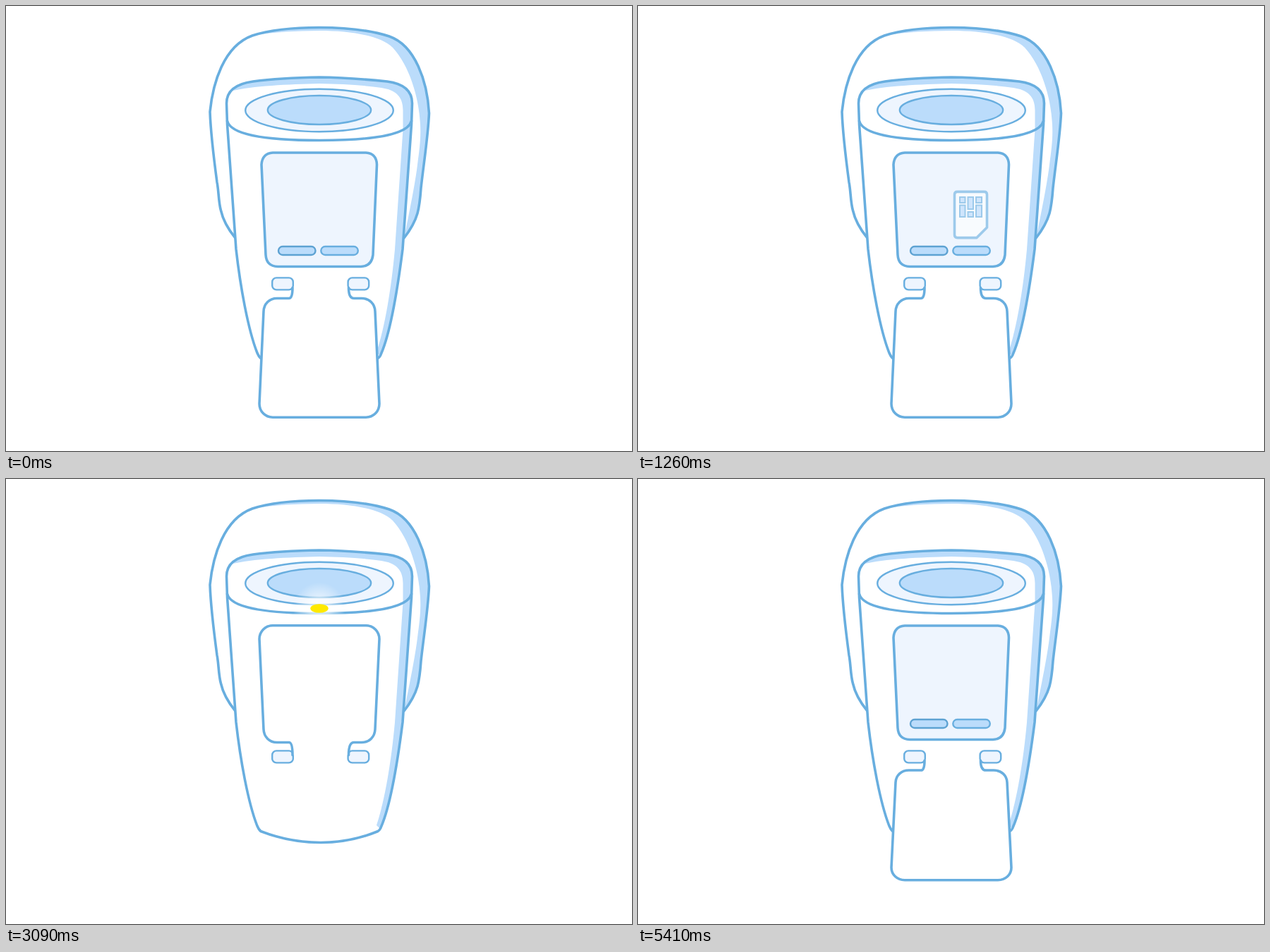
Recreate the animation shown at these times as an HTML page. Size 887x631 px, loop 5.44 s.

```html
<!DOCTYPE html>
<html lang="en">
<head>
<meta charset="utf-8">
<title>Card reader</title>
<style>
  html, body { margin: 0; width: 100%; height: 100%; overflow: hidden; background: #fff; }
  svg { display: block; width: 100%; height: 100%; }
  .line { stroke: #68aedf; stroke-width: 3.6; stroke-linecap: round; stroke-linejoin: round; fill: none; }
  .thin { stroke: #68aedf; stroke-width: 2.4; }
  .white { fill: #fff; }
  .pale { fill: #eef5fe; }
  .tint { fill: #bbdcfb; }
</style>
</head>
<body>
<svg viewBox="0 0 887 631">
  <defs>
    <radialGradient id="halo">
      <stop offset="0" stop-color="#fff" stop-opacity=".8"/>
      <stop offset=".4" stop-color="#fff" stop-opacity=".6"/>
      <stop offset="1" stop-color="#fff" stop-opacity="0"/>
    </radialGradient>
    <path id="cap" d="M325 329C316 318 308 306 304.500 290C301 278 301.500 262 299 250C295 220 290 180 289 150
      C293 110 308 57 349 42C375 33.500 410 30.500 444 30.500C480 30.500 515 34 543 43C580 56 597 107 599.500 152
      C598 185 592 222 588 258C587 272 586 283 583 294C579 308 571 320 564 329"/>
    <path id="body" d="M312.500 138C312.500 119 328 110 350 107C380 103 415 101.500 444 101C478 101.500 515 104.500 540 107
      C563 110 575.500 120 575.500 138L574.500 168L562 345C555 400 546 459 532 492Q530 498 527 499.500
      Q488 515.500 446 515.500Q402 515.500 361 499.500Q358 497 356 492C343 459 332 398 326 345L313.500 168Z"/>
  </defs>

  <use href="#cap" class="white"/>
  <path class="tint" d="M352 41C375 33.500 410 30.500 444 30.500C480 30.500 515 34 543 43C580 56 597 107 599.500 152
    C598 185 592 222 588 258C587 272 586 283 583 294C579 308 571 320 564 329C572 290 580 250 583 225
    C586 202 588 188 587 168C585 128 571 84 548 59C531 42 488 35 444 35Q395 35 352 41Z"/>
  <use href="#cap" class="line"/>

  <use href="#body" class="white"/>
  <path class="tint" d="M318 121C325 112 337 109 350 107C380 103 415 101.500 444 101C478 101.500 515 104.500 540 107
    C563 110 575.500 120 575.500 138L574.500 168L562 345C555 400 546 459 532 492L529 495L525 491
    C537 455 546 400 551 345L562.500 175V148C562.500 128 552 119 532 116C505 112 475 110.500 444 110C400 111 350 113 318 121Z"/>
  <use href="#body" class="line"/>
  <path class="line" d="M313.500 163C318 181 360 190.500 444 190.500S570 181 574.500 163"/>
  <ellipse class="pale thin" cx="444" cy="148" rx="104.800" ry="30.200"/>
  <ellipse class="tint thin" cx="444" cy="147.500" rx="73.200" ry="20.500"/>
  <g id="lamp">
    <circle cx="444" cy="183.500" r="37" fill="url(#halo)"/>
    <ellipse cx="444" cy="183.500" rx="12.700" ry="6.300" fill="#ffe900"/>
  </g>

  <path class="line pale" d="M378 208H510Q525 209 525.500 225L520 353Q518 369 503 369.500H385Q369 369 368 353L362 225Q363 209 378 208Z"/>
  <rect class="tint thin" x="386" y="341" width="52.500" height="12" rx="6" style="stroke:#5da2d2"/>
  <rect class="tint thin" x="446.300" y="341" width="52.500" height="12" rx="6"/>
  <g id="card">
    <path class="line white" d="M452.500 245.500H490.500Q494.500 245.500 494.500 249.500V296L480 310.700H452.500Q448.500 310.700 448.500 306.700V249.500Q448.500 245.500 452.500 245.500Z"/>
    <path class="tint thin" style="stroke-width:2" d="M456 253h7.500v8h-7.500zM467.500 253h7.500v17h-7.500zM479 253h8v8h-8z
      M456 264.500h7.500v16.500h-7.500zM467.500 274h7.500v7h-7.500zM479 264.500h8v16.500h-8z"/>
  </g>

  <rect class="pale thin" x="377.200" y="385.400" width="29.600" height="17" rx="6"/>
  <rect class="pale thin" x="484.600" y="385.400" width="29.600" height="17" rx="6"/>
  <path id="door" class="line white"/>
</svg>
<script>
const LOOP = 5440, TICK = 30;
const card = document.getElementById('card');
const lamp = document.getElementById('lamp');
const door = document.getElementById('door');
const clamp = x => Math.max(0, Math.min(1, x));
const tick = ms => Math.floor(ms / TICK) * TICK;

// fold runs from -1 (hanging open) to 1 (shut) around the hinge line
function doorPath(fold) {
  const y = d => (395.5 - fold * d).toFixed(2);
  const inset = fold > 0 ? 3 : 0;
  const edge = y(19 + inset), low = y(37.5 + inset), high = y(168.5), end = y(187.7);
  const hook = y(4), bend = y(15 + inset);
  return `M406 ${hook}C406 ${bend} 404 ${edge} 401 ${edge}H384C373 ${edge} 365.500 ${y(27 + inset)} 365 ${low}` +
    `L359 ${high}C359 ${y(179)} 367 ${end} 378 ${end}H510C521 ${end} 529 ${y(179)} 529 ${high}` +
    `L523 ${low}C522.500 ${y(27 + inset)} 515 ${edge} 504 ${edge}H493C489 ${edge} 485.500 ${bend} 485.500 ${hook}`;
}

function doorFold(t) {
  if (t < 1550) return -1;
  if (t < 1970) return -0.8 + 1.8 * tick(t - 1550) / 420;
  if (t < 4990) return 1;
  return 0.797 - 1.72 * tick(t - 4990) / 420;
}

function drawCard(t) {
  const age = tick(t) % 450;
  const shown = t < 1350 ? Math.min(clamp(age / 90), clamp((450 - age) / 150)) : 0;
  const lift = 53 * (1 - clamp(age / 410)) ** 3;
  card.setAttribute('opacity', shown);
  card.setAttribute('transform', `translate(0 ${(18 - lift).toFixed(2)})`);
}

function draw(t) {
  drawCard(t);
  const lit = t >= 2040 && t < 4890;
  lamp.setAttribute('opacity', lit ? Math.abs(Math.sin(Math.PI * (tick(t) - 2010) / 720)) : 0);
  door.setAttribute('d', doorPath(doorFold(t)));
}

const start = performance.now();
function frame() {
  draw((performance.now() - start) % LOOP);
  requestAnimationFrame(frame);
}
draw(0);
requestAnimationFrame(frame);
</script>
</body>
</html>
```
